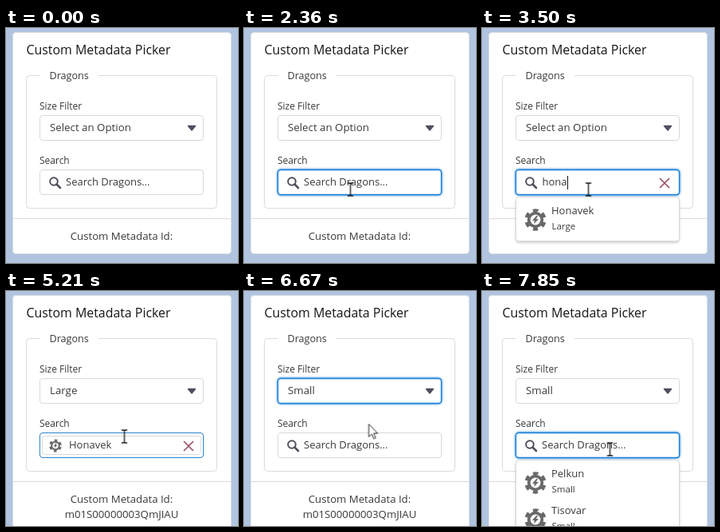
Animation, 291 px wide and 294 px high, one loop 8000 ms. Source, as an HTML page:

```html
<!DOCTYPE html>
<html lang="en">
<head>
<meta charset="utf-8">
<title>Custom Metadata Picker</title>
<style>
html, body { margin: 0; width: 100%; height: 100%; overflow: hidden; background: #b0c4df; }
svg { display: block; width: 291px; height: 294px; }
text { font: 13px "Open Sans", "Noto Sans", sans-serif; fill: #3b3a39; }
.title { font-size: 15.9px; fill: #16161a; }
.legend { font-size: 12.6px; }
.label { font-size: 12px; }
.value { font-size: 13.3px; }
.sub { font-size: 11.5px; }
.foot { font-size: 13.2px; text-anchor: middle; }
.box { fill: #fff; stroke: #d9d8d7; }
.line { fill: none; stroke: #dddbda; }
.ring { fill: #fff; stroke: #1b7fd8; stroke-width: 1.4; filter: drop-shadow(0 0 1.5px #0070d2); }
.thin { fill: #fff; stroke: #2f83c8; }
.menu { fill: #fff; stroke: #d9d8d7; filter: drop-shadow(0 2px 1.5px rgba(0,0,0,.18)); }

/* Parts that switch on and off, or fade, or move */
.on { animation: var(--k) 8s step-end infinite; }
.fade { animation: var(--k) 8s linear infinite; }

@keyframes noSize { 0% { visibility: visible } 50.625%, 100% { visibility: hidden } }
@keyframes picked { 0% { visibility: hidden } 50.625% { visibility: visible } 81.5%, 100% { visibility: hidden } }
@keyframes small { 0% { visibility: hidden } 81.5%, 100% { visibility: visible } }
@keyframes result { 0% { visibility: hidden } 50.625%, 100% { visibility: visible } }
@keyframes hint { 0% { visibility: visible } 35.125% { visibility: hidden } 81.5%, 100% { visibility: visible } }
@keyframes lens { 0% { visibility: visible } 50.625% { visibility: hidden } 81.5%, 100% { visibility: visible } }
@keyframes clear { 0% { visibility: hidden } 35.125% { visibility: visible } 81.5%, 100% { visibility: hidden } }
@keyframes key1 { 0% { visibility: hidden } 35.125% { visibility: visible } 50.625%, 100% { visibility: hidden } }
@keyframes key2 { 0% { visibility: hidden } 36.125% { visibility: visible } 50.625%, 100% { visibility: hidden } }
@keyframes key3 { 0% { visibility: hidden } 37% { visibility: visible } 50.625%, 100% { visibility: hidden } }
@keyframes key4 { 0% { visibility: hidden } 38% { visibility: visible } 50.625%, 100% { visibility: hidden } }
@keyframes match { 0% { visibility: hidden } 43.75% { visibility: visible } 50.625%, 100% { visibility: hidden } }
@keyframes hover { 0% { visibility: hidden } 79% { visibility: visible } 81.5%, 100% { visibility: hidden } }
@keyframes caret {
  0% { visibility: hidden; transform: none }
  22.5% { visibility: visible; transform: none }
  29.5% { visibility: hidden; transform: none }
  35.125% { visibility: visible; transform: translateX(9px) }
  36.125% { visibility: visible; transform: translateX(16.8px) }
  37% { visibility: visible; transform: translateX(24.8px) }
  38% { visibility: visible; transform: translateX(32px) }
  44.75% { visibility: hidden; transform: none }
  92% { visibility: visible; transform: none }
  98.125%, 100% { visibility: hidden; transform: none }
}

@keyframes searchFocus {
  0%, 21.5% { opacity: 0 } 24.375%, 50.62% { opacity: 1 }
  50.63%, 91.25% { opacity: 0 } 93.125%, 100% { opacity: 1 }
}
@keyframes pillFocus { 0%, 50.62% { opacity: 0 } 50.63%, 73% { opacity: 1 } 74.75%, 100% { opacity: 0 } }
@keyframes sizeFocus { 0%, 73% { opacity: 0 } 74.75%, 91.25% { opacity: 1 } 93.125%, 100% { opacity: 0 } }
@keyframes sizeMenu { 0%, 73% { opacity: 0 } 74%, 81.5% { opacity: 1 } 83%, 100% { opacity: 0 } }
@keyframes list { 0%, 91.25% { opacity: 0 } 93.125%, 100% { opacity: 1 } }

@keyframes move {
  0%, 3.12% { transform: translate(220px, 320px) }
  3.125% { transform: translate(217px, 288px) }
  6.5% { transform: translate(185px, 250px) }
  9.5% { transform: translate(140px, 212px) }
  10.5% { transform: translate(132.5px, 195px) }
  11.5% { transform: translate(132.5px, 176px) }
  12.625%, 13.6% { transform: translate(137px, 149px) }
  13.625% { transform: translate(141.5px, 133px) }
  14.5%, 15.62% { transform: translate(143.5px, 136px) }
  19.625%, 65.12% { transform: translate(133.5px, 202px) }
  65.125%, 66.12% { transform: translate(148.5px, 182px) }
  70.125%, 77.6% { transform: translate(156.5px, 121px) }
  80%, 84.37% { transform: translate(156.5px, 166.5px) }
  87.25%, 88.24% { transform: translate(160.5px, 182.5px) }
  88.25%, 100% { transform: translate(160.5px, 198px) }
}
@keyframes arrow {
  0% { visibility: visible } 9.6% { visibility: hidden }
  11.4% { visibility: visible } 13.625% { visibility: hidden }
  16.1% { visibility: visible } 18% { visibility: hidden }
  66.5% { visibility: visible } 68.7% { visibility: hidden }
  78.6% { visibility: visible } 87%, 100% { visibility: hidden }
}
@keyframes beam {
  0% { visibility: hidden } 9.6% { visibility: visible }
  11.4% { visibility: hidden } 13.625% { visibility: visible }
  16.1% { visibility: hidden } 18% { visibility: visible }
  66.5% { visibility: hidden } 68.7% { visibility: visible }
  78.6% { visibility: hidden } 87%, 100% { visibility: visible }
}
</style>
</head>
<body>
<svg viewBox="0 0 291 294">
  <defs>
    <g id="gear">
      <circle r="10.2" fill="#6b6968"/>
      <circle r="11.2" fill="none" stroke="#6b6968" stroke-width="5" pathLength="12" stroke-dasharray="1 1" transform="rotate(15)"/>
      <circle r="6.4" fill="#fff"/>
      <path d="M1-5-4 1h3L-2 5.2 4-1H1L3-5z" fill="#6b6968"/>
    </g>
  </defs>

  <!-- Card -->
  <rect x="8.5" y="5.5" width="274" height="277" rx="4" fill="#fff" stroke="#d3d8e0"/>
  <rect class="on" style="--k:result" x="8.5" y="5.5" width="274" height="310" rx="4" fill="#fff" stroke="#d3d8e0"/>
  <path class="line" d="M9 238.5h273"/>
  <text class="title" x="25.5" y="33">Custom Metadata Picker</text>
  <path class="line" d="M43 59.5H29.500a4 4 0 0 0-4 4V221.500a4 4 0 0 0 4 4H260.500a4 4 0 0 0 4-4V63.500a4 4 0 0 0-4-4H116"/>
  <text class="legend" x="54.500" y="64">Dragons</text>
  <text class="foot" x="145" y="265">Custom Metadata Id:</text>
  <text class="foot on" style="--k:result" x="145" y="284">m01S00000003QmJIAU</text>

  <!-- Size filter -->
  <text class="label" x="42" y="102">Size Filter</text>
  <rect class="box" x="42.5" y="109.5" width="205" height="31" rx="3.5"/>
  <rect class="ring fade" style="--k:sizeFocus" x="42.5" y="109.5" width="205" height="31" rx="3.5"/>
  <text class="value on" style="--k:noSize" x="55" y="129">Select an Option</text>
  <text class="value on" style="--k:picked" x="55" y="129">Large</text>
  <text class="value on" style="--k:small" x="55" y="129">Small</text>
  <path d="M228.500 122.500h9l-4.500 5.500z" fill="#514f60" stroke="#514f60" stroke-width="1.500" stroke-linejoin="round"/>

  <!-- Search -->
  <text class="label" x="42" y="170">Search</text>
  <rect class="box" x="42.5" y="177.500" width="205" height="31" rx="3.5"/>
  <rect class="ring fade" style="--k:searchFocus" x="42.5" y="177.500" width="205" height="31" rx="3.5"/>
  <rect class="thin fade" style="--k:pillFocus" x="42.5" y="177.500" width="205" height="31" rx="3.5"/>
  <g class="on" style="--k:lens" fill="none" stroke="#514f5c" stroke-width="2">
    <circle cx="60" cy="192" r="4.800"/>
    <path d="M63.500 195.500l4.500 4.500" stroke-width="2.600" stroke-linecap="round"/>
  </g>
  <text class="on" style="--k:hint" x="75" y="197">Search Dragons...</text>
  <text x="75.500" y="197"><tspan class="on" style="--k:key1">h</tspan><tspan class="on" style="--k:key2">o</tspan><tspan class="on" style="--k:key3">n</tspan><tspan class="on" style="--k:key4">a</tspan></text>
  <rect class="on" style="--k:caret" x="75" y="185" width="1" height="17" fill="#111"/>
  <g class="on" style="--k:picked">
    <rect class="box" x="45.500" y="181.500" width="199" height="23" rx="3"/>
    <use href="#gear" transform="translate(62 193.500) scale(.58)"/>
    <text x="79" y="197">Honavek</text>
  </g>
  <path class="on" style="--k:clear" d="M223.500 188.500l11 11m0-11l-11 11" fill="none" stroke="#9a5068" stroke-width="1.700" stroke-linecap="round"/>

  <!-- Menus -->
  <g class="on" style="--k:match">
    <rect class="menu" x="42.500" y="211.500" width="205" height="55" rx="4"/>
    <use href="#gear" x="67" y="240"/>
    <text x="87" y="233">Honavek</text>
    <text class="sub" x="87.500" y="252">Large</text>
  </g>
  <g class="fade" style="--k:list">
    <rect class="menu" x="42.500" y="211.500" width="205" height="120" rx="4"/>
    <use href="#gear" x="67" y="240"/>
    <text x="87" y="233">Pelkun</text>
    <text class="sub" x="87.500" y="252">Small</text>
    <use href="#gear" x="67" y="286"/>
    <text x="87" y="279">Tisovar</text>
    <text class="sub" x="87.500" y="298">Small</text>
  </g>
  <g class="fade" style="--k:sizeMenu">
    <rect class="menu" x="42.500" y="143.500" width="205" height="116" rx="4"/>
    <rect class="on" style="--k:hover" x="43" y="148" width="204" height="36" fill="#f3f2f2"/>
    <text x="79" y="170">Small</text>
    <text x="79" y="206">Medium</text>
    <text x="79" y="242">Large</text>
    <path d="M56 238l4 4 8-8" fill="none" stroke="#0070d2" stroke-width="2"/>
  </g>

  <!-- Pointer -->
  <g class="fade" style="--k:move">
    <path class="on" style="--k:arrow" d="M0 0V16l3.700-3.500 2.500 5.900 2.500-1.100-2.500-5.700h5z" fill="#fff" stroke="#222"/>
    <path class="on" style="--k:beam" d="M-3.500-8H-1L0-7 1-8H3.500M0-7V7M-3.500 8H-1L0 7 1 8H3.500" fill="none" stroke="#111" stroke-width="1.300"/>
  </g>
</svg>
</body>
</html>
```
